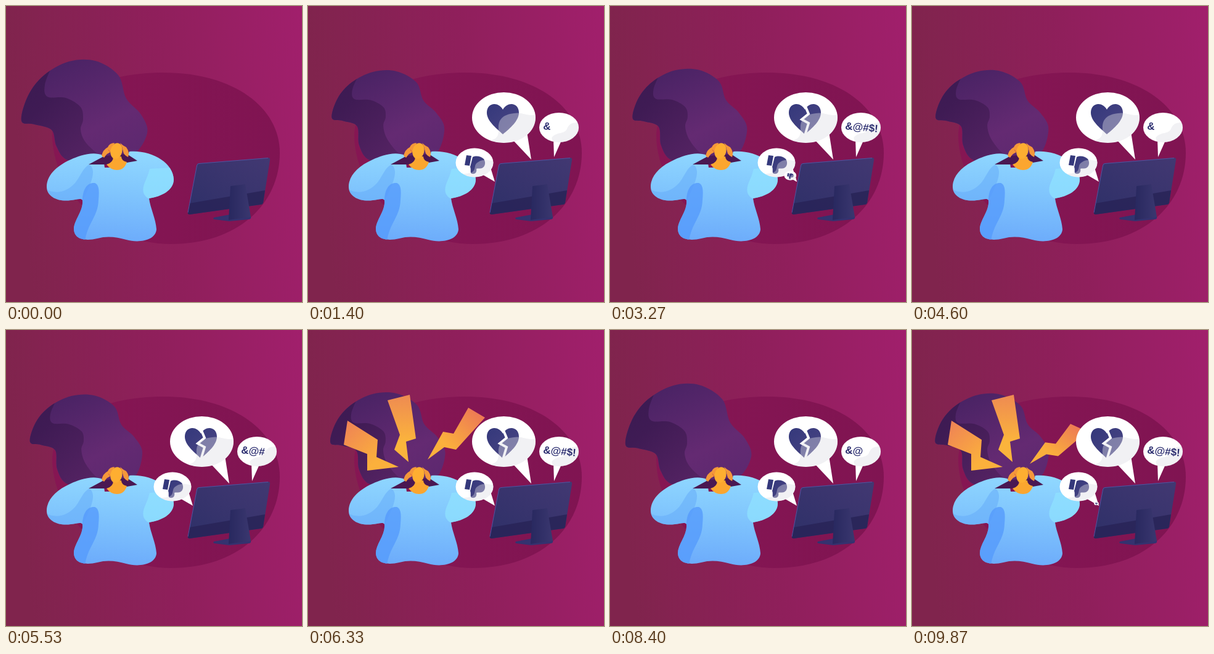
An HTML page for the animation above (9.94 s loop, 480x480 px).

```html
<!DOCTYPE html>
<html>
<head>
<meta charset="utf-8">
<style>
html, body { margin: 0; width: 100%; height: 100%; overflow: hidden; background: #8f2060; }
svg { display: block; width: 100vw; height: 100vh; }
text { font: bold 17px "Liberation Sans", Arial, sans-serif; fill: #2c2e70; }
.gloss { fill: #dcdce4; opacity: .4; }
</style>
</head>
<body>
<svg viewBox="0 0 480 480">
  <defs>
    <linearGradient id="bg" x1="0" y1=".1" x2="1" y2="0"><stop offset="0" stop-color="#80244d"/><stop offset=".5" stop-color="#8f1f5b"/><stop offset="1" stop-color="#a11f6c"/></linearGradient>
    <linearGradient id="blob" x1="0" x2="1"><stop offset="0" stop-color="#861653"/><stop offset="1" stop-color="#801452"/></linearGradient>
    <linearGradient id="light" x1=".2" y1="0" x2=".8" y2="1"><stop offset="0" stop-color="#472263"/><stop offset=".65" stop-color="#642a72"/><stop offset="1" stop-color="#5c286f"/></linearGradient>
    <linearGradient id="dark" x1="0" y1="0" x2=".7" y2="1"><stop offset="0" stop-color="#371a50"/><stop offset=".5" stop-color="#3f1b54"/><stop offset="1" stop-color="#552363"/></linearGradient>
    <linearGradient id="knit" x1=".5" y1="0" x2=".4" y2="1"><stop offset="0" stop-color="#90d8ff"/><stop offset=".45" stop-color="#80c5fd"/><stop offset="1" stop-color="#6cabfb"/></linearGradient>
    <linearGradient id="panel" x1="0" y1="1" x2="1" y2="0"><stop offset="0" stop-color="#2e3068"/><stop offset="1" stop-color="#423872"/></linearGradient>
    <linearGradient id="stand" x1="0" x2="1"><stop offset="0" stop-color="#28285f"/><stop offset="1" stop-color="#3a376f"/></linearGradient>
    <linearGradient id="boltL" x1="0" y1="0" x2="1" y2="1"><stop offset="0" stop-color="#ee8057"/><stop offset=".7" stop-color="#fbb03c"/></linearGradient>
    <linearGradient id="boltM" x1="0" y1="0" x2="0" y2="1"><stop offset="0" stop-color="#ee8a52"/><stop offset=".7" stop-color="#fbb43c"/></linearGradient>
    <linearGradient id="boltR" x1="1" y1="0" x2="0" y2="1"><stop offset="0" stop-color="#ea7059"/><stop offset=".7" stop-color="#fbb03c"/></linearGradient>
    <linearGradient id="navy" x1="0" y1="0" x2="1" y2="1"><stop offset="0" stop-color="#34387b"/><stop offset="1" stop-color="#4b4684"/></linearGradient>
    <clipPath id="hairClip"><path id="hairEdge"/></clipPath>
    <clipPath id="bodyClip"><use href="#body"/></clipPath>
    <clipPath id="heartClip"><ellipse cx="317.500" cy="181" rx="51.500" ry="41"/></clipPath>
    <clipPath id="wordClip"><ellipse cx="407" cy="197" rx="32" ry="24"/></clipPath>
    <clipPath id="thumbClip"><ellipse cx="270" cy="254" rx="30.500" ry="23.500"/></clipPath>
  </defs>

  <rect width="480" height="480" fill="url(#bg)"/>
  <path fill="url(#blob)" d="M255 108C370 108 444 165 444 238C444 322 375 386 268 386C150 386 75 290 75 210C75 150 150 108 255 108Z"/>

  <path id="hair" fill="url(#light)"/>
  <path id="shade" fill="url(#dark)" clip-path="url(#hairClip)"/>

  <polygon id="bolt0" fill="url(#boltL)" points="64,147 113,178 111,206 147,222 96,228 96,201 58,186"/>
  <polygon id="bolt1" fill="url(#boltM)" points="129,114 165,105 175,176 159,181 163,214 140,194 149,170"/>
  <polygon id="bolt2" fill="url(#boltR)" points="260,126 287,142 240,194 221,190 194,210 219,165 236,168"/>

  <!-- woman -->
  <path id="body" fill="url(#knit)" d="M157 242C140 235 118 243 105 249C80 260 66 276 66 293C66 310 86 318 105 315C115 314 122 311 124 315C126 332 110 347 110 362C111 380 131 381 148 377C165 372 180 375 195 379C216 385 243 380 244 362C243 345 234 328 232 312C252 309 272 299 272 281C271 254 236 233 200 236L190 262H160Z"/>
  <g clip-path="url(#bodyClip)">
    <path fill="#67adf9" opacity=".55" d="M60 295C80 307 98 302 112 287C121 276 124 263 135 257C147 265 140 285 124 316L60 330Z"/>
    <path fill="#559bfd" opacity=".8" d="M124 313C125 296 132 286 144 287C152 290 151 303 150 315C149 342 132 352 128 382L100 385Z"/>
    <path fill="#8fe2ff" opacity=".75" d="M233 264C229 282 220 290 223 303C226 310 231 313 236 313C254 308 268 302 274 285V262Z"/>
  </g>
  <path fill="#4a1852" d="M134 257L160 243L196 240L213 251L196 254Q180 262 163 257Z"/>
  <path fill="#fba62f" d="M163 257Q174 254 174 244H187Q187 251 196 253Q192 266 180 266Q170 266 163 257Z"/>
  <path fill="#f4973a" d="M155 243Q157 233 165 229Q168 222 176 222L172 236Q164 238 159 246ZM185 222Q189 226 195 229Q201 237 198 245Q191 242 190 236Q189 229 185 222Z"/>
  <ellipse cx="179" cy="235" rx="9.500" ry="13" fill="#feae31" transform="rotate(14 179 235)"/>
  <path fill="none" stroke="#d9603d" d="M166 233L169 237"/>

  <!-- computer -->
  <path fill="url(#panel)" d="M313 255L425 246Q429 246 428 250L417 319Q416 322 413 322L298 338Q294 338 295 334L309 259Q310 255 313 255Z"/>
  <path fill="#292458" opacity=".85" d="M297.500 320L420 299L417 319Q416 322 413 322L298 338Q294 338 295 334Z"/>
  <path fill="none" stroke="#5652a0" d="M295 335L309.500 259Q310 255.500 313 255.500L425 246.500"/>
  <path fill="#34326f" d="M337 343L364 338L397 342Q398 345 394 346L362 349L338 346Q335 345 337 343Z"/>
  <path fill="url(#stand)" d="M364 292L388 289L397 342L361 347Z"/>

  <!-- bubbles -->
  <g id="heart">
    <path fill="#fff" d="M331 216L362 249L355 204Z"/>
    <ellipse cx="317.500" cy="181" rx="51.500" ry="41" fill="#fff"/>
    <path fill="url(#navy)" d="M316 208C304 197 290 186 290 173C290 157 308 154 316 168C324 154 342 157 342 173C342 186 328 198 316 208Z"/>
    <path id="crack" fill="none" stroke="#fff" stroke-width="4" d="M317 163L322 175L311 184L322 190L316 210"/>
    <path class="gloss" clip-path="url(#heartClip)" d="M372 176C355 180 348 171 334 174C314 176 308 186 309 200C310 212 304 217 292 219L320 230L372 215Z"/>
  </g>
  <g id="word">
    <path fill="#fff" d="M398 216L399 245L412 216Z"/>
    <ellipse cx="407" cy="197" rx="32" ry="24" fill="#fff"/>
    <path class="gloss" clip-path="url(#wordClip)" d="M442 190C430 188 424 190 420 199C416 209 402 203 395 214L400 225L442 222Z"/>
    <text id="curse" x="381" y="200" transform="rotate(5 381 200)"></text>
  </g>
  <g id="thumb">
    <path fill="#fff" d="M284 274L303 285L296 262Z"/>
    <ellipse cx="270" cy="254" rx="30.500" ry="23.500" fill="#fff"/>
    <path fill="#34387b" d="M257 242L265 243L262 259L254 258Z"/>
    <path fill="url(#navy)" d="M267 245C273 242 281 244 285 248C289 254 287 261 282 263C278 264 275 263 273 264C274 269 272 273 266 272C262 271 265 266 263 261Z"/>
    <path class="gloss" clip-path="url(#thumbClip)" d="M303 252C290 249 282 249 276 253C268 257 273 264 267 269C262 272 255 271 250 273L270 282L303 275Z"/>
  </g>
</svg>

<script>
const LOOP = 9940, CYCLE = LOOP / 3;
const SWING = 900;
const BOLT_TIPS = [[147, 222], [163, 214], [194, 210]];
const HAIR = [[25,186], [36,145], [62,112], [102,90], [145,89], [182,112], [195,150], [219,176],
  [229,206], [205,242], [150,258], [100,250], [82,228], [74,201], [46,192]];
const SHADE = [[74,98], [63,128], [67,147], [97,149], [121,164], [125,184], [121,200], [127,218],
  [143,235], [160,246]];
const $ = id => document.getElementById(id);
const clamp = v => Math.max(0, Math.min(1, v));

// the next thumb bubble grows over the first
const nextThumb = $("thumb").cloneNode(true);
$("thumb").after(nextThumb);

// smooth curve through points
function spline(pts, closed) {
  const n = pts.length;
  const at = i => pts[closed ? (i + n) % n : Math.max(0, Math.min(n - 1, i))];
  let d = "M" + pts[0];
  for (let i = 0; i < (closed ? n : n - 1); i++) {
    const [a, b, c, e] = [at(i - 1), at(i), at(i + 1), at(i + 2)];
    d += "C" + [0, 1].map(j => b[j] + (c[j] - a[j]) / 6) + " " + [0, 1].map(j => c[j] - (e[j] - b[j]) / 6) + " " + c;
  }
  return d;
}

// squeezes the hair towards the head, less near the neck
function squeeze([x, y], k) {
  const w = k * clamp((235 - y) / 45);
  return [x - (x - 133) * .13 * w, y - (y - 165) * .23 * w];
}

function pop(p, start, length, over) {
  if (p <= start) return 0;
  const q = clamp((p - start) / length) - 1;
  return 1 + (over + 1) * q ** 3 + over * q * q;
}

function grow(el, x, y, s) {
  el.style.display = s > 0 ? "" : "none";
  el.setAttribute("transform", `translate(${x} ${y}) scale(${s}) translate(${-x} ${-y})`);
}

function drawHair(p) {
  const k = (1 - Math.cos(2 * Math.PI * p / SWING)) / 2;
  const edge = spline(HAIR.map(v => squeeze(v, k)), true);
  $("hair").setAttribute("d", edge);
  $("hairEdge").setAttribute("d", edge);
  $("shade").setAttribute("d", spline(SHADE.map(v => squeeze(v, k))) + "L160 270L0 270L0 60Z");
}

function drawBolts(p) {
  BOLT_TIPS.forEach((tip, i) => grow($("bolt" + i), ...tip, p < 3256 ? pop(p, 2300 + 70 * i, 400, 2.7) : 0));
  // the right bolt ducks before they all vanish
  const duck = 1 - .23 * clamp((p - 3170) / 70);
  if (duck < 1) $("bolt2").setAttribute("transform", `translate(-3 ${240 * (1 - duck)}) scale(1 ${duck})`);
}

function draw(t) {
  const p = t % CYCLE;
  drawHair(p);
  drawBolts(p);
  grow($("thumb"), 303, 285, pop(p, 30, 500, 1.4));
  grow(nextThumb, 303, 285, pop(p, 3230, 500, 1.4));
  grow($("heart"), 362, 249, pop(p, 450, 500, 1.4));
  grow($("word"), 399, 245, pop(p, 950, 330, 1.4));
  $("crack").style.display = p > 1550 ? "" : "none";
  $("curse").textContent = "&@#$!".slice(0, Math.max(0, Math.floor((p - 860) / 340)));
}

const begin = performance.now();
function tick(now) {
  draw(Math.max(0, now - begin) % LOOP);
  requestAnimationFrame(tick);
}
draw(0);
requestAnimationFrame(tick);
</script>
</body>
</html>
```
